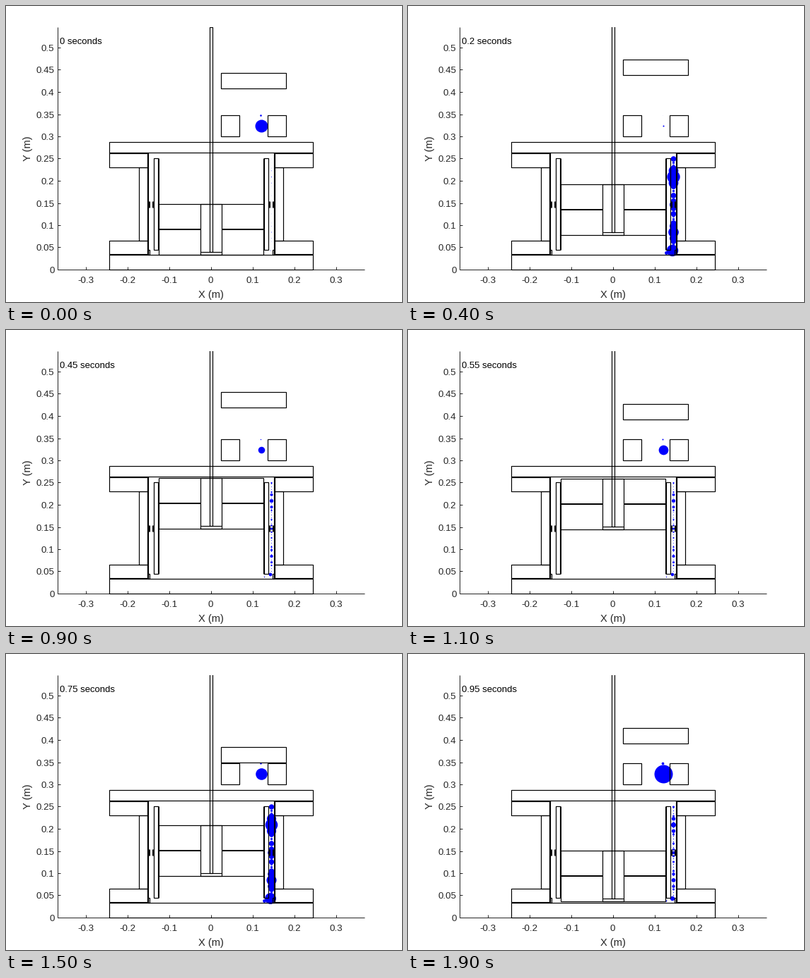
These frames come from a looping animation (560 px wide and 420 px high, 2 s). A matplotlib script:

```python
import numpy as np
import matplotlib.pyplot as plt
from matplotlib.animation import FuncAnimation
from matplotlib.patches import Circle, Rectangle

W, H, DPI = 560, 420, 100
FRAMES, INTERVAL = 20, 100
PX = 72 / DPI
INK = "#262626"
MID = 290  # symmetry axis of the machine

plt.rcParams["font.family"] = "Liberation Sans"
fig = plt.figure(figsize=(W / DPI, H / DPI), dpi=DPI, facecolor="white")
ax = fig.add_axes([0, 0, 1, 1])
# whole coordinates fall on pixel centres, so snapping is not needed
ax.set_xlim(-0.5, W - 0.5)
ax.set_ylim(H - 0.5, -0.5)
ax.axis("off")


def line(xs, ys, color="black", width=1.2):
    return ax.plot(xs, ys, color=color, lw=width * PX, zorder=3, snap=False,
                   solid_capstyle="butt")[0]


def box(x0, y0, x1, y1):
    return ax.add_patch(Rectangle((x0, y0), x1 - x0, y1 - y0, fill=False,
                                  ec="black", lw=1.2 * PX, zorder=3,
                                  snap=False))


def both_sides(x0, y0, x1, y1):
    box(x0, y0, x1, y1)
    box(2 * MID - x1, y0, 2 * MID - x0, y1)


def dot(x, y):
    return ax.add_patch(Circle((x, y), 1, fc="blue", ec="none", zorder=2))


def label(x, y, s, size=13.33, color=INK, **kw):
    kw = {"ha": "center", "va": "baseline", **kw}
    return ax.text(x - 1, y, s, fontsize=size * PX, color=color, **kw)


def draw_axes():
    line([73, 73], [30, 374], INK, 1)
    line([73, 507], [374, 374], INK, 1)
    for i in range(-3, 4):
        x = MID + 59 * i
        line([x, x], [374, 370], INK, 1)
        label(x, 393, f"{i / 10:g}")
    for i in range(11):
        y = round(374 - 31.5 * i)
        line([73, 77], [y, y], INK, 1)
        label(69, y + 5, f"{i * 0.05:.2g}", ha="right")
    label(290, 414, "X (m)", 14.67)
    label(31, 202, "Y (m)", 14.67, rotation=90, va="center")


def draw_housing():
    box(146, 193, 434, 208)
    box(146, 353, 434, 374)
    both_sides(146, 209, 200, 229)
    both_sides(146, 333, 200, 352)
    both_sides(188, 229, 200, 333)
    both_sides(209, 216, 215, 346)
    both_sides(201, 346, 203, 353)
    both_sides(304 - 54, 0, 0, 0) if False else None
    for s in (-1, 1):
        line([MID + 89 * s] * 2, [208, 353])
        line([MID + 74.5 * s] * 2, [216, 346], width=2)
        for dx in (87.5, 82.5):
            line([MID + dx * s] * 2, [277, 286], width=2)
    box(304, 155, 330, 185)
    box(370, 155, 396, 185)


def channel_spots():
    """Flow markers as (x, y, relative radius)."""
    spots = [(375, y, 0.18) for y in range(218, 346, 4)]
    spots += [(375, 216.5 + 13 * i, 0.42) for i in range(10)]
    for y, k, gap in ((242, 1, 8.7), (281.5, 0.6, 4.7), (320.5, 0.8, 8.7)):
        spots += [(375, y, k)]
        spots += [(375, y + d, 0.75 * k) for d in (-gap, gap)]
    return spots + [(373.5, 346.5, 0.9), (365, 350, 0.27)]


def piston_top(a):
    return 245 + 36 * np.cos(a) - 2.9 * np.sin(a) ** 2 - 0.6 * np.sin(a)


def slider_top(a):
    return 99.7 - 0.4 * np.cos(a) - 28 * np.sin(a) - 4.2 * np.cos(2 * a)


def flow(a):
    s, c = np.sin(a), np.cos(a)
    return 0.5 + abs(s) * (8.3 + c * abs(s) * (5 - 2.4 * s))


def leak(t):
    return np.interp(t, [0, 0.2, 0.35, 0.5, 0.85, 0.95],
                     [9, 1, 1.3, 6.5, 9, 13], period=1)


draw_axes()
draw_housing()
clock = label(77, 54, "", 13.1, "black", ha="left")
spots = channel_spots()
dots = [dot(x, y) for x, y, _ in spots]
valve, pilot = dot(361, 170), dot(360, 155)

piston = box(216, 0, 364, 72)
hub = box(275, 0, 305, 72)
slider = box(304, 0, 396, 22)
seams = [line(xs, [0, 0], width=2) for xs in ([216, 275], [305, 364])]
foot = line([275, 305], [0, 0])
rod = box(288, 0, 292, 319)
rod.set_clip_path(Rectangle((73, 29.4), 434, 345, transform=ax.transData))


def update(i):
    t = i / FRAMES
    a = 2 * np.pi * t
    clock.set_text(f"{t:g} seconds")

    top = round(piston_top(a))
    piston.set_y(top)
    hub.set_y(top)
    rod.set_y(top - 251)
    foot.set_ydata([top + 68] * 2)
    for s in seams:
        s.set_ydata([top + 35.5] * 2)
    slider.set_y(round(slider_top(a)))

    for d, (_, _, k) in zip(dots, spots):
        d.set_radius(flow(a) * k)
    valve.set_radius(leak(t))
    pilot.set_radius(leak(t) / 7)
    return []


anim = FuncAnimation(fig, update, frames=FRAMES, interval=INTERVAL,
                     init_func=lambda: update(0), repeat=True,
                     repeat_delay=0, blit=False)
plt.show()
```
